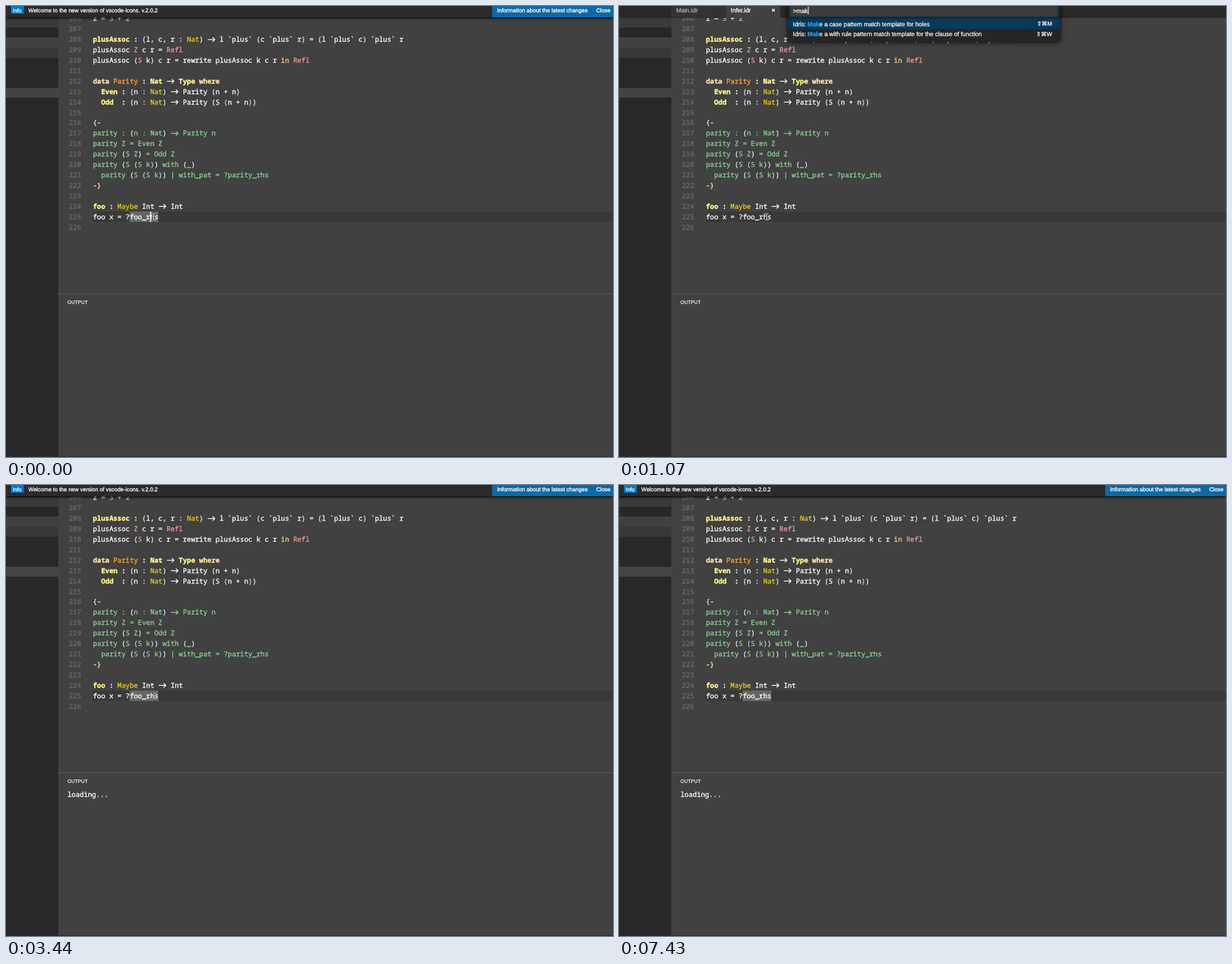
These frames come from a looping animation (869x645 px, 8 s). An HTML page with a canvas:

```html
<!DOCTYPE html>
<html lang="en">
<head>
<meta charset="utf-8">
<title>Editor command palette</title>
<style>
  html, body { margin: 0; width: 869px; height: 645px; overflow: hidden; background: #414141; }
  canvas { display: block; }
</style>
</head>
<body>
<canvas id="stage" width="869" height="645"></canvas>
<script>
const ctx = document.getElementById('stage').getContext('2d');
const LOOP = 8000;
const MONO = '"Noto Sans Mono", "DejaVu Sans Mono", monospace';
const SANS = '"Liberation Sans", "DejaVu Sans", sans-serif';
const PITCH = 5.85, CODE_X = 124.5, FIRST_LINE = 206;

// Style key: colour and weight.
const STYLES = {
  w: ['#f6f6f6', 500], b: ['#f6f6f6', 700], y: ['#fdf88c', 700],
  k: ['#f7e3a6', 700], o: ['#f9a02c', 500], g: ['#d8c322', 500],
  p: ['#dc9797', 500], c: ['#8ac890', 500], n: ['#7fc4d4', 500],
  i: ['#eec48c', 500], d: ['#f3dfb8', 500]
};
const BRACKETS = ['#d9e3f6', '#a5d8e2'];  // by nesting depth

// "§" plus a style key starts a new run.
const CODE = [
  '§wz = §n3§w + §n2',
  '',
  '§yplusAssoc§b : §w(l, c, r : §gNat§w) -> l `plus` (c `plus` r) = (l `plus` c) `plus` r',
  '§wplusAssoc §pZ§w c r = §pRefl',
  '§wplusAssoc (§pS§w k) c r = rewrite plusAssoc k c r §iin §pRefl',
  '',
  '§kdata §oParity§b : §yNat§b -> §yType §kwhere',
  '  §yEven§b : §w(n : §gNat§w) -> Parity (n + n)',
  '  §yOdd§b  : §w(n : §gNat§w) -> Parity (S (n + n))',
  '',
  '§d{-',
  '§cparity : (n : Nat) -> Parity n',
  '§cparity Z = Even Z',
  '§cparity (S Z) = Odd Z',
  '§cparity (S (S k)) with (_)',
  '§c  parity (S (S k)) | with_pat = ?parity_rhs',
  '§d-}',
  '',
  '§yfoo§b : §gMaybe §wInt -> Int',
  '§wfoo x = ?foo_rhs',
  ''
];

const COMMANDS = [
  ['Add Cursor Above', '⌥⌘↑'],
  ['Add Cursor Below', '⌥⌘↓'],
  ['Add Line Comment', '⌘K ⌘C'],
  ['Add Selection To Next Find Match', '⌘D'],
  ['Add Selection To Previous Find Match', ''],
  ['Change All Occurrences', '⌘F2'],
  ['Change End of Line Sequence', ''],
  ['Change File Encoding', ''],
  ['Change Language Mode', '⌘K M'],
  ['Clear Editor History', ''],
  ['Close Notification Messages', 'Escape, ⇧Escape'],
  ['Close Window', '⌘W'],
  ['Configure Language', ''],
  ['Convert Indentation to Spaces', ''],
  ['Convert Indentation to Tabs', ''],
  ['Copy', '⌘C'],
  ['Copy Line Down', '⇧⌥↓'],
  ['Idris: Make a case pattern match template for holes', '⇧⌘M'],
  ['Idris: Make a with rule pattern match template for the clause of function', '⇧⌘W']
];

const QUERIES = [
  [300, ''], [920, 'ma'], [1070, 'mak'], [1220, 'make'],
  [1370, 'make c'], [1510, 'make ca'], [1660, 'make cas'], [1800, 'make case']
];
const CARET_TOGGLES = [300, 2100, 2550, 3000, 3440, 4030, 4460, 4910, 5490, 5940, 6380, 6980, 7430];

function rect(x, y, w, h, color) {
  ctx.fillStyle = color;
  ctx.fillRect(x, y, w, h);
}

// Fills text and thickens it with a thin outline.
function ink(str, x, y, font, color, outline) {
  ctx.font = font;
  ctx.fillStyle = ctx.strokeStyle = color;
  ctx.lineWidth = outline;
  ctx.fillText(str, x, y);
  ctx.strokeText(str, x, y);
}

function mono(str, x, y, color, weight = 500) {
  ink(str, x, y + 3.2, `${weight} 9.75px ${MONO}`, color, 0.35);
}

// Draws interface text centred on y and returns its width.
function label(str, x, y, size, color, weight = 400, align = 'left') {
  ctx.textAlign = align;
  ink(str, x, y + size * 0.35, `${weight} ${size}px ${SANS}`, color, 0.3);
  ctx.textAlign = 'left';
  return ctx.measureText(str).width;
}

function path(points, color, width) {
  ctx.beginPath();
  points.forEach(([x, y], i) => i ? ctx.lineTo(x, y) : ctx.moveTo(x, y));
  ctx.strokeStyle = color;
  ctx.lineWidth = width;
  ctx.stroke();
}

function arrow(x, y, color) {
  path([[x + 0.5, y], [x + 10.5, y]], color, 1.2);
  path([[x + 7.5, y - 3], [x + 10.7, y], [x + 7.5, y + 3]], color, 1.2);
}

function codeLine(line, y) {
  let x = CODE_X, depth = 0;
  line.split('§').forEach((run, i) => {
    const [color, weight] = STYLES[i ? run[0] : 'w'];
    for (const part of (i ? run.slice(1) : run).match(/->|[()]|[^()-]+|-/g) || []) {
      if (part === '->') arrow(x, y, color);
      else if (part === '(') mono(part, x, y, BRACKETS[depth++], weight);
      else if (part === ')') mono(part, x, y, BRACKETS[--depth], weight);
      else mono(part, x, y, color, weight);
      x += part.length * PITCH;
    }
  });
}

function sidebar() {
  rect(0, 0, 75, 645, '#28282a');
  rect(0, 17, 75, 14, '#3a3a3c');
  rect(0, 45, 75, 15, '#404042');
  rect(0, 60, 75, 14, '#383839');
  rect(0, 117, 75, 14, '#434345');
}

function editor(focused, caret) {
  rect(124, 294, 745, 15, '#393939');
  if (focused) rect(177, 294, 41, 15, '#666');
  CODE.forEach((line, i) => {
    const y = 48 + (i - 2) * 14.91;
    mono(String(FIRST_LINE + i), 90, y, '#666', 400);
    codeLine(line, y);
  });
  if (caret) rect(206.3, 294, 1.4, 15, '#fff');
}

function panel(loading) {
  rect(75, 411, 794, 1, '#575757');
  label('OUTPUT', 88, 424, 7.05, '#e6e6e6');
  if (loading) mono('loading...', 88, 442.3, '#f6f6f6');
  rect(0, 644, 869, 1, '#2c2c2c');
}

function shadowed(color, blur, draw) {
  ctx.save();
  ctx.shadowColor = color;
  ctx.shadowBlur = blur;
  ctx.shadowOffsetY = 1;
  draw();
  ctx.restore();
}

function notification() {
  shadowed('#000', 4, () => rect(0, -4, 869, 20, '#2b2b2c'));
  rect(7, 0, 18.5, 11, '#007acc');
  label('Info', 9.5, 6, 7.6, '#fff');
  label('Welcome to the new version of vscode-icons. v.2.0.2', 32, 6, 7.98, '#f4f4f4');
  rect(696, 0, 173, 16, '#0c69a8');
  label('Information about the latest changes', 703, 6, 8.03, '#fff');
  label('Close', 845, 6, 8.03, '#fff');
}

function tabs() {
  rect(75, 0, 794, 17, '#292929');
  rect(75, 0, 78, 16, '#333');
  rect(153, 0, 78, 17, '#414141');
  label('Main.idr', 82, 6, 8.6, '#a8a8a8');
  label('Infer.idr', 160, 6, 8.6, '#fff');
  path([[219, 4], [223, 8]], '#f0f0f0', 1.2);
  path([[223, 4], [219, 8]], '#f0f0f0', 1.2);
}

// Splits a command into plain and matched parts, or null if a word is missing.
function match(name, query) {
  const words = query.split(' ').map(w => `(\\b${w})`).join('(.*?)');
  const found = name.match(new RegExp(`^(.*?)${words}(.*)$`, 'i'));
  return found && found.slice(1);
}

function palette(query) {
  const rows = COMMANDS
    .map(([name, keys]) => ({ parts: match(name, query), keys }))
    .filter(row => row.parts)
    .slice(0, 17);
  const height = 18.5 + rows.length * 14.28 + 4;
  shadowed('#000', 7, () => rect(242, -5, 389, height + 5, '#252526'));
  rect(245.5, -1, 382, 16, '#0d4f7c');
  rect(246.5, -1, 380, 15, '#3b3b3c');
  const end = 249 + label('>' + query, 249, 6.5, 8.65, '#f0f0f0');
  rect(end + 0.2, 1, 1, 11, '#fff');
  rect(242, 18.5, 389, 14.28, '#063a5d');
  rows.forEach(({ parts, keys }, i) => {
    const y = 25.6 + i * 14.28;
    let x = 249;
    parts.forEach((part, j) => {
      x += j % 2 ? label(part, x, y, 8.6, '#139ffc', 700) : label(part, x, y, 8.6, '#f0f0f0');
    });
    label(keys, 620, y, 8.2, '#f0f0f0', 400, 'right');
  });
}

function pointerAt(t) {
  if (t < 3440) return [211.5, 301.5];
  const step = Math.floor((t - 3440) / 146.5);
  if (step > 8) return [844 + (step - 9) * 4, 620 + (step - 9) * 4];
  const u = step / 9;
  const ease = u * u * (3 - 2 * u);
  return [213 + 631 * ease, 301.5 + 318.5 * ease];
}

function pointer([x, y]) {
  for (const [color, width] of [['#2b2b2b', 2.2], ['#d8d8d8', 1]]) {
    path([[x, y - 4], [x, y + 4]], color, width);
    for (const s of [-1, 1]) {
      path([[x - 2.5, y + 5 * s], [x, y + 4 * s], [x + 2.5, y + 5 * s]], color, width);
    }
  }
}

function draw(t) {
  const open = t >= 300 && t < 2100;
  const toggles = CARET_TOGGLES.filter(time => time <= t).length;
  ctx.textRendering = 'geometricPrecision';
  ctx.lineJoin = 'round';
  rect(0, 0, 869, 645, '#414141');
  editor(!open, toggles % 2 === 0);
  sidebar();
  panel(t >= 2400);
  if (t >= 470 && t < 2100) tabs(); else notification();
  if (open) palette(QUERIES.filter(([time]) => time <= t).pop()[1]);
  pointer(pointerAt(t));
}

const start = performance.now();
function tick() {
  draw((performance.now() - start) % LOOP);
  requestAnimationFrame(tick);
}
tick();
</script>
</body>
</html>
```
